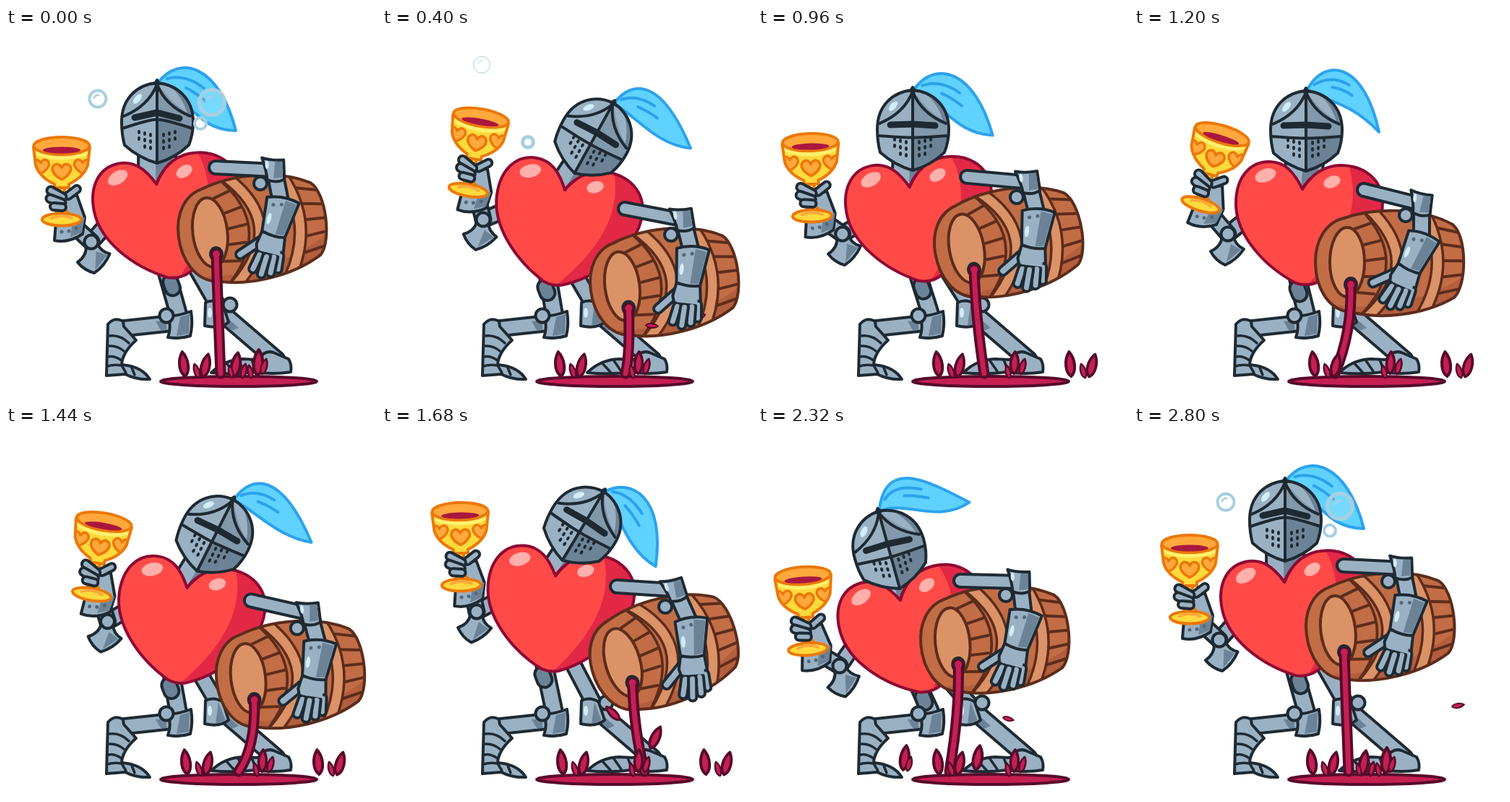
Recreate the animation shown at these times as an HTML page with a canvas. Size 512 px wide and 512 px high, loop 2880 ms.

```html
<!DOCTYPE html>
<html lang="en">
<head>
<meta charset="utf-8">
<title>Knight of hearts</title>
<style>
html, body { margin: 0; width: 100%; height: 100%; overflow: hidden; background: #fff; }
canvas { display: block; width: 512px; height: 512px; }
</style>
</head>
<body>
<canvas id="stage" width="512" height="512"></canvas>
<script>
const ctx = document.getElementById('stage').getContext('2d');
const LOOP = 2880, STEP = 80, RAD = Math.PI / 180;
const INK = '#1e2a33', STEEL = '#9ab1c4', SHADE = '#6c8397', SHINE = '#d3edf8';
const WOOD = '#c26d46', PALE = '#dc9267', BARK = '#5d2c1b';
const GOLD = '#ffda3d', AMBER = '#ffa83c', RUST = '#ec7809';
const WINE = '#c51f54', DARKWINE = '#560b2a';

// Key poses: x, y and, where it turns, an angle in degrees.
const TIMES = [0, 400, 720, 920, 1200, 1480, 1680, 2120, 2320, 2560, 2800];
const HEART = [[237,348,-11],[236,358,8.5],[233,350,0],[235,352,-10],[236,358,0],[236,358,8],[232,342,4.7],[237,362,-19],[237,370,-16],[237,345,-12],[237,348,-11]];
const HEAD = [[209,130,0],[294,151,29],[263,139,26],[215,140,0],[238,141,0],[295,150,30],[279,137,31],[178,155,-14],[181,170,-15.5],[198,118,-4],[209,130,0]];
const NOD = [1, 0, 0, 0, 0, 0, 0, 0, 0, .5, 1].map(v => [v]);
const CUP = [[77,163,0],[137,124,10],[90,140,-8],[68,158,-4],[122,147,17],[135,130,8],[108,118,-1],[51,190,-4],[62,207,-4],[70,160,-2],[77,163,0]];
const ELBOW = [[118,296],[140,265],[126,276],[116,285],[130,285],[141,268],[131,257],[106,318],[113,332],[115,296],[118,296]];
const BARREL = [[340,276,-6.7],[390,350,-7.3],[386,300,-21],[348,292,-12],[353,324,0],[397,342,-8],[389,311,-16],[322,280,-8],[327,294,-5.4],[333,270,-7],[340,276,-6.7]];
const SHOULDER = [[290,193],[336,250],[318,221],[288,205],[318,224],[340,242],[325,222],[275,204],[280,214],[284,185],[290,193]];
const JOINT = [[352,215],[400,286],[386,244],[358,232],[376,259],[405,280],[392,250],[338,222],[343,234],[347,208],[352,215]];
const WRIST = [[370,288,14.6],[424,357,6.6],[429,310,-9],[385,302,4],[380,335,24],[432,350,6],[430,320,-3],[352,294,15],[357,308,15],[363,282,14],[370,288,14.6]];
const POUR = [297, 337, 354, 320, 278, 330, 363, 268, 265, 290, 297].map(v => [v]);
// Plume: two upper controls, the tip, two lower controls.
const FEATHERS = [
  [30,-40,85,-25,108,66,55,66,45,22], [25,-33,66,-35,106,62,60,58,30,18],
  [40,-14,78,15,65,106,25,85,35,22], [22,-45,78,-45,100,57,65,20,35,15],
  [35,-20,85,5,71,103,30,80,20,28], [8,-72,62,-45,125,-12,80,18,40,-15]];
const PLUME = [0, 1, 2, 0, 3, 1, 4, 5, 5, 0, 0].map(i => FEATHERS[i]);

function pose(rows, t) {
  const n = TIMES.length;
  const time = k => TIMES[(k + n) % n] + LOOP * Math.floor(k / n);
  const row = k => rows[(k + n) % n];
  let i = n - 1;
  while (TIMES[i] > t) i--;
  const span = time(i + 1) - time(i), u = (t - time(i)) / span;
  const slope = (k, c) => (row(k + 1)[c] - row(k - 1)[c]) / (time(k + 1) - time(k - 1)) * span;
  return row(i).map((a, c) => {
    const b = row(i + 1)[c], d = b - a;
    if (!d) return a;
    const m = slope(i, c), q = slope(i + 1, c);
    return a + u * (m + u * (3 * d - 2 * m - q + u * (m + q - 2 * d)));
  });
}

function shape(d, fill, line = INK, width = 4) {
  const p = new Path2D(d);
  if (fill) { ctx.fillStyle = fill; ctx.fill(p); }
  if (line) { ctx.strokeStyle = line; ctx.lineWidth = width; ctx.stroke(p); }
}
function oval(x, y, rx, ry, fill, line, width = 4, deg = 0) {
  ctx.beginPath();
  ctx.ellipse(x, y, rx, ry, deg * RAD, 0, 7);
  if (fill) { ctx.fillStyle = fill; ctx.fill(); }
  if (line) { ctx.strokeStyle = line; ctx.lineWidth = width; ctx.stroke(); }
}
function limb(x1, y1, x2, y2, w, fill = STEEL) {
  const d = `M${x1},${y1}L${x2},${y2}`;
  shape(d, null, INK, w);
  shape(d, null, fill, w - 8);
}
function at([x, y, deg = 0], draw, scale = 1) {
  ctx.save();
  ctx.translate(x, y);
  ctx.rotate(deg * RAD);
  ctx.scale(scale, scale);
  draw();
  ctx.restore();
}
function clipTo(d, draw) {
  ctx.save();
  ctx.clip(new Path2D(d));
  draw();
  ctx.restore();
}
// A point given in the frame of a pose, in stage coordinates.
function place([x, y, deg], px, py) {
  const c = Math.cos(deg * RAD), s = Math.sin(deg * RAD);
  return [x + px * c - py * s, y + px * s + py * c];
}

function legs(heart) {
  limb(...place(heart, 22, -30), 294, 386, 25);
  limb(303, 398, 374, 459, 27);
  shape('M305,400L322,415L312,419L300,407Z', SHADE, null);
  shape('M284,477Q302,459 328,458L349,459Q358,445 370,449L391,458Q396,466 394,476Q370,480 345,476Q315,480 284,477Z', STEEL);
  shape('M304,463L316,476M320,459L331,475M340,459L345,472', null, INK, 3.5);
  shape('M276,380Q288,374 300,382L308,407Q296,417 275,412Z', STEEL);
  shape('M294,382L304,408L290,412Z', SHADE, null);
  oval(282, 394, 3, 7, SHINE);
  oval(310, 383, 9.5, 9.5, STEEL, INK);

  limb(...place(heart, -14, -30), 238, 394, 27);
  const [sx, sy] = place(heart, -10, 2);
  limb(sx, sy, sx + 3, sy + 8, 25, SHADE);
  limb(160, 416, 225, 409, 25);
  shape('M207,406L222,405L222,418L214,418Z', SHADE, null);
  shape('M141,410Q150,399 162,406L163,413L180,432Q161,449 160,466Q188,468 199,486Q180,487 165,479L139,481Z', STEEL);
  shape('M143,426Q158,424 170,436M143,440Q154,439 163,447M141,455Q150,453 160,460M140,468Q150,465 160,467M160,467L166,477M174,470L178,480', null, INK, 3.5);
  shape('M225,399Q240,398 256,392Q259,410 255,426Q240,431 224,428Q229,414 225,399Z', STEEL);
  shape('M241,400L254,396L253,423L236,426Z', SHADE, null);
  oval(222, 398, 9.5, 9.5, STEEL, INK);
}

function plume(spot, f) {
  const blend = (a, b, k) => a + (b - a) * k;
  at(spot, () => {
    shape(`M0,0C${f.slice(0, 6)}C${f.slice(6)} 0,0Z`, '#60d2ff', '#2ca2ee');
    for (const [k, from, to] of [[.3, .12, .58], [.55, .36, .62]]) {
      const bx = [0, blend(f[0], f[8], k), blend(f[2], f[6], k), f[4]];
      const by = [0, blend(f[1], f[9], k), blend(f[3], f[7], k), f[5]];
      ctx.beginPath();
      for (let j = 0; j <= 8; j++) {
        const u = from + (to - from) * j / 8, v = 1 - u;
        const b = p => 3 * v * v * u * p[1] + 3 * v * u * u * p[2] + u * u * u * p[3];
        ctx.lineTo(b(bx), b(by));
      }
      ctx.strokeStyle = '#2ca2ee';
      ctx.lineWidth = 4;
      ctx.stroke();
    }
  });
}

function helmet(head, nod) {
  const shell = 'M0,-54C27,-52 50,-33 50,0Q50,17 44,32Q25,50 0,57Q-25,50 -45,32Q-49,17 -49,0C-49,-33 -27,-52 0,-54Z';
  const brow = 11 - 13 * nod;
  at(head, () => {
    shape(shell, STEEL, null);
    clipTo(shell, () => {
      shape(`M0,-54Q24,-20 50,-9V12L0,${brow}Z`, '#8298ab', null);
      shape('M12,-54Q33,-40 42,-12L60,0V-60Z', SHADE, null);
      shape(`M0,${brow}L50,9V60H0Z`, SHADE, null);
      oval(-27, -32, 4, 8, SHINE, null, 0, 40);
    });
    shape('M0,-52Q-12,-22 -46,-8M0,-52Q12,-22 46,-8');
    shape(`M-48,9Q0,${brow * 1.5 - 4} 0,${brow}Q0,${brow * 1.5 - 4} 49,9M0,-56V57`);
    shape(`M-31,-6L0,${-7 - 6 * nod}L31,-5`, null, INK, 9);
    for (const side of [-1, 1])
      for (let r = 0; r < 3; r++)
        for (let c = 0; c < 3 - (r > 1); c++)
          oval(side * (9 + c * 8), 18 + r * 9 - c * 2, 2, 3, INK);
    shape(shell, null);
    shape('M-3,-53L0,-58L3,-53Z', INK);
  });
}

function bigHeart(heart) {
  const body = 'M-3,-135C8,-153 24,-167 49,-168C83,-168 108,-148 108,-116C108,-67 55,-19 12,-4Q0,-1 -12,-5C-57,-29 -95,-72 -95,-115C-95,-151 -76,-173 -49,-173C-27,-173 -14,-158 -3,-135Z';
  at(heart, () => {
    shape(body, '#ff4a48', null);
    clipTo(body, () => {
      shape('M60,-170C78,-120 62,-64 2,0H120V-180Z', '#e32846', null);
      oval(-54, -154, 15, 9, '#ffb0aa', null, 0, -20);
      oval(38, -145, 12, 8, '#ffb0aa', null, 0, -22);
    });
    shape(body, null, '#8d0934');
    shape('M-3,-135Q2,-144 8,-149', null, '#8d0934');
  });
}

function cask(barrel) {
  const body = 'M-62,-61C-20,-76 45,-76 88,-52C108,-36 108,32 90,49C45,75 -15,79 -53,69C-88,66 -102,30 -102,0C-102,-30 -88,-55 -62,-61Z';
  const hoop = (top, belly) => `M${top},-76Q${2 * belly - top},0 ${top},76`;
  const band = (top, belly, w) => {
    shape(hoop(top, belly), null, BARK, w + 7);
    shape(hoop(top, belly), null, PALE, w);
  };
  at(barrel, () => {
    shape(body, WOOD, null);
    clipTo(body, () => {
      shape('M-70,60Q20,70 104,20V90H-70Z', '#b35e3d', null);
      for (const y of [-46, -24, -2, 20, 42]) {
        const bow = 1 - (y / 76) ** 2;
        shape(`M${-58 + 26 * Math.sqrt(1 - (y / 50) ** 2)},${y}L${-52 + 45 * bow},${y * 1.12 - 3}`, null, BARK);
        shape(`M${46 + 26 * bow},${y * 1.05}L104,${y * .85}`, null, BARK);
      }
      shape(hoop(-42, -4), null, BARK, 3.5);
      band(-30, 11, 12);
      band(44, 67, 12);
    });
    oval(-58, 0, 24, 48, PALE, BARK);
    shape(body, null, BARK);
    oval(-53, 31, 8, 9, WINE, INK);
  });
}

function goblet(cup, elbow, heart) {
  limb(...elbow, ...place(cup, 14, 108), 25);
  at([...elbow, heart[2]], () => {
    shape('M-24,24Q-10,18 -8,4L8,4Q10,15 22,21Q12,36 -4,43Q-17,37 -24,24Z', STEEL);
    shape('M4,14L18,22L-2,39Z', SHADE, null);
  });
  oval(...elbow, 9.5, 9.5, STEEL, INK);

  const bowl = 'M-39,2L-36,27Q-31,43 -10,53V58H10V53Q31,43 36,27L39,2Z';
  const charm = (x, y, s) => at([x, y], () =>
    shape('M0,-5C5,-15 16,-9 13,0Q9,8 0,12Q-9,8 -13,0C-16,-9 -5,-15 0,-5Z', AMBER, RUST, 4), s);
  at(cup, () => {
    shape('M21,68L32,99L29,122Q10,135 -10,131L-7,94L6,74Z', STEEL);
    shape('M15,104L32,99L28,120L12,126Z', SHADE, null);
    for (const [x, y] of [[0, 119], [10, 118], [20, 114]]) oval(x, y, 2.5, 2.5, '#52687a');
    shape('M-4,53Q-1,70 -4,88L-12,98H12L5,88Q2,68 5,53Z', GOLD, RUST);
    oval(0, 102, 27, 8.5, GOLD, RUST);
    shape('M-14,100Q0,94 14,100', null, AMBER, 4);
    shape(bowl, GOLD, null);
    clipTo(bowl, () => {
      shape('M-36,10Q0,24 36,10', null, '#fff06d', 5);
      charm(-29, 28, .85);
      charm(0, 35, .95);
      charm(29, 28, .85);
    });
    shape(bowl, null, RUST);
    oval(0, 0, 38.5, 12, AMBER, RUST);
    oval(0, 6, 26, 4.5, '#aa173f');
    limb(9, 69, 21, 60, 14);
    limb(-15, 62, 1, 71, 15);
    limb(-16, 73, 0, 79, 15);
    limb(-11, 84, 1, 85, 14);
  });
}

function gripArm(shoulder, joint, wrist) {
  const [wx, wy, turn] = wrist;
  const plate = [...joint, turn * .9];
  const fold = place(plate, 15, -22);
  limb(...shoulder, ...fold, 22);
  limb(...fold, ...place(wrist, 0, -44), 26);
  at(plate, () => {
    shape('M-6,-35Q8,-34 24,-39L31,-13Q22,-5 8,-7Q5,-18 -6,-35Z', STEEL);
    shape('M13,-34L23,-36L28,-15L16,-11Z', SHADE, null);
    oval(3, -27, 2.5, 6, SHINE, null, 0, -15);
  });
  oval(...joint, 9, 9, STEEL, INK);
  at(wrist, () => {
    limb(-11, 6, -38, 36, 16);
    shape('M-17,-2L16,-2L20,25L12,36L-14,35L-20,16Z', STEEL);
    limb(-12, 30, -16, 51, 15);
    limb(16, 24, 18, 43, 14);
    limb(8, 28, 9, 50, 15);
    limb(-2, 30, -3, 55, 15);
    shape('M-13,2L14,2L15,24L-14,24Z', STEEL, null);
    shape('M-22,-50Q0,-59 23,-53L16,-2Q0,2 -17,-3Z', STEEL);
    shape('M4,-52L20,-50L14,-5L2,-3Z', SHADE, null);
    oval(-11, -42, 2.5, 2.5, '#52687a');
    oval(0, -45, 2.5, 2.5, '#52687a');
    oval(-12, -22, 3, 8, SHINE);
  });
}

const drop = (x, y, deg, size) => at([x, y, deg], () =>
  shape('M0,-18C8,-7 8,10 0,16C-8,10 -8,-7 0,-18Z', WINE, DARKWINE, 4), size);

function clump(x, lean, size = 1) {
  drop(x - 15, 466, -7 + lean, size);
  drop(x + 3, 475, -18 + lean, .6 * size);
  drop(x + 15, 468, 13 + lean, .95 * size);
}

// Airborne wine: moment, x, y, speed, tilt, size, start and end.
const SPRAY = [
  [400, 373, 412, .2, 95, .5, 240, 560], [400, 441, 400, .33, 60, .42, 240, 560],
  [720, 333, 434, -.2, -35, .55, 560, 800], [1680, 320, 398, -.15, -45, .75, 1520, 1840],
  [1680, 378, 432, .2, 25, .95, 1520, 1840], [2320, 346, 405, .25, 105, .45, 2160, 2480],
  [2800, 448, 387, .2, 80, .5, 2640, 2840]];

function spill(t, barrel, end) {
  const [hx, hy] = place(barrel, -53, 31);
  oval(322, 489, 108, 7, WINE, DARKWINE);
  const flow = `M${hx},${hy}Q${hx + 2},${hy + 65} ${end},478`;
  shape(flow, null, DARKWINE, 15);
  shape(flow, null, WINE, 7);
  oval(hx, hy, 5, 5, WINE);

  const still = t < 200 || t > 2500;
  clump(still || t < 500 ? 261 : 264, 0);
  drop(still ? 349 : 355, 464, 3, still ? 1.05 : .9);
  drop(still ? 338 : 346, 476, -12, .55);
  drop(still ? 357 : 366, 469, 16, .65);
  if (still) { drop(318, 467, 10, 1); drop(329, 475, 14, .6); drop(311, 476, -14, .5); }
  if (t >= 560 && t < 1840) clump(447 + Math.max(0, t - 1440) / 16, 2, t > 640 ? 1 : .6);
  if (t >= 2160 && t < 2480) { drop(203, 460, 8, 1); drop(209, 468, 15, .6); drop(304, 460, 10, 1); }
  for (const [when, x, y, speed, deg, size, from, to] of SPRAY) {
    const d = t - when;
    if (t >= from && t <= to) drop(x + speed * d, y + .08 * d + .0006 * d * d, deg, size);
  }
}

function bubble(x, y, r, w) {
  oval(x, y, r, r, 'rgba(255,255,255,.15)', '#a9cfe0', w);
  if (r > 10) shape(`M${x - r * .45},${y - r * .1}Q${x - r * .3},${y - r * .5} ${x + r * .1},${y - r * .45}`, null, '#a9cfe0', Math.min(w, 2.5));
}
function bubbles(t) {
  const age = t > 2400 ? t - LOOP : t;
  if (age > -320 && age <= 400) {
    const fade = Math.max(0, age) / 400;
    bubble(127 + 11 * fade, 98 - (age < 0 ? .09 : .118) * age, 11.5, 4 - 3 * fade);
  }
  if (age > -240 && age < 240) {
    const w = age > 0 ? 5 - age / 60 : 5;
    bubble(285, 103 - .1 * age, 17.5, w);
    bubble(269 - age / 40, 132 - .16 * age, 8, w * .8);
  }
  if (age >= 240 && age < 640) bubble(202, 158 - .12 * (age - 400), 7.5, age > 400 ? 5 - (age - 400) / 60 : 5);
}

function scene(t) {
  const heart = pose(HEART, t), head = pose(HEAD, t), cup = pose(CUP, t);
  const elbow = pose(ELBOW, t), barrel = pose(BARREL, t);
  ctx.fillStyle = '#fff';
  ctx.fillRect(0, 0, 512, 512);
  ctx.lineCap = ctx.lineJoin = 'round';
  legs(heart);
  plume(place(head, 1, -54), pose(PLUME, t));
  limb(...elbow, ...place(heart, -75, -98), 25);
  const [nx, ny] = place(heart, -3, -130);
  limb(head[0], head[1] + 15, nx, ny, 56);
  shape(`M${head[0] + 9},${head[1] + 15}L${nx + 9},${ny}`, null, SHADE, 22);
  bigHeart(heart);
  helmet(head, pose(NOD, t)[0]);
  goblet(cup, elbow, heart);
  cask(barrel);
  spill(t, barrel, pose(POUR, t)[0]);
  gripArm(pose(SHOULDER, t), pose(JOINT, t), pose(WRIST, t));
  bubbles(t);
}

function tick() {
  scene(Math.floor(performance.now() % LOOP / STEP) * STEP);
  requestAnimationFrame(tick);
}
tick();
</script>
</body>
</html>
```
